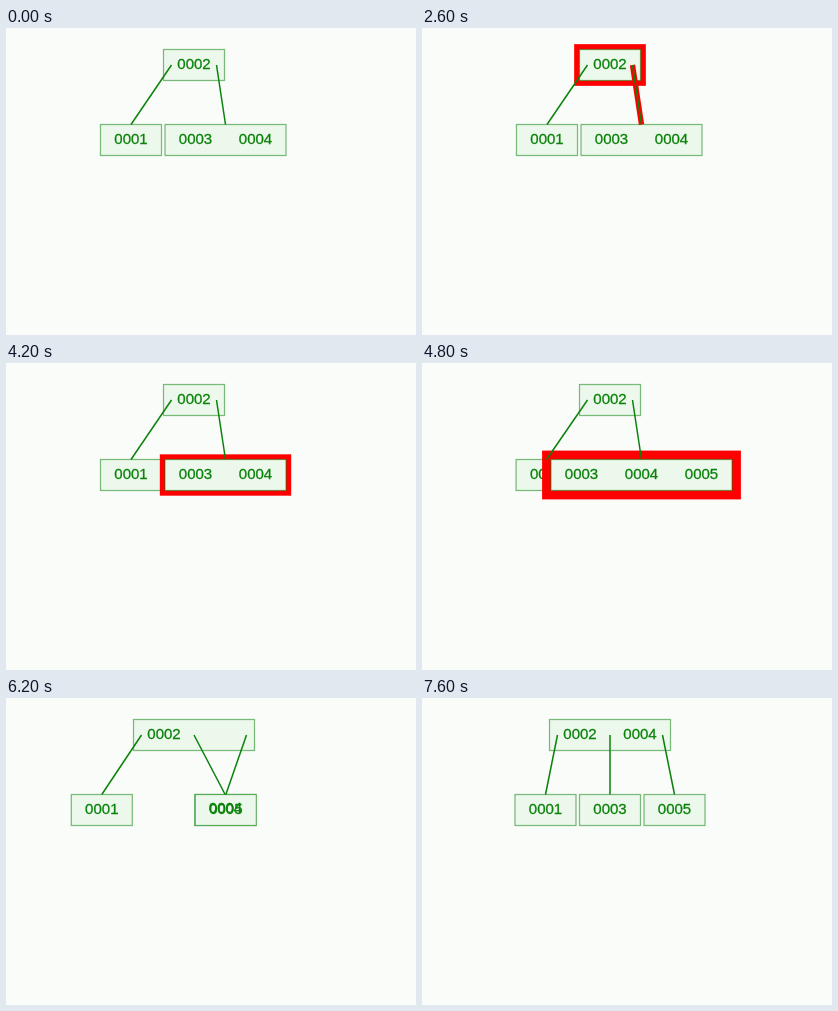
Animation of 410x307 px, one loop 8000 ms. Source, as an HTML page with a canvas:

```html
<!DOCTYPE html>
<html lang="en">
<head>
<meta charset="utf-8">
<title>Tree insertion</title>
<style>
  html, body { margin: 0; width: 100%; height: 100%; overflow: hidden; background: #fafcfa; }
  canvas { display: block; }
</style>
</head>
<body>
<canvas id="stage" width="410" height="307"></canvas>
<script>
const ctx = document.getElementById('stage').getContext('2d');
const LOOP = 8000, TICK = 100, LAST = 7600;
const GREEN = '#0a820a', BORDER = 'rgba(0,125,0,.5)', FILL = '#ecf8ec', RED = '#ff0000';
const ROOT_Y = 37, LEAF_Y = 112, SLOT = 60, HALF_H = 15.5;

// After the opening highlight, each block of the insertion takes the same time.
const START = 500, BLOCK = 1405;
const at = n => 565 + n * BLOCK;
const FOLLOW = at(1), DESCEND = at(2), INSERT = at(3), SPLIT = at(4), DONE = at(5);

const mix = (a, b, p) => a + (b - a) * p;
const progress = (t, from) => Math.min(1, Math.max(0, (t - from) / BLOCK));

// Triangle wave for the size of the highlight.
function pulse(t) {
  const low = 4.5, high = 11.2, half = 790, peak = 330;
  const phase = ((t - peak) % (2 * half) + 2 * half) % (2 * half);
  return low + (high - low) * Math.abs(phase - half) / half;
}

function label(text, x, y) {
  ctx.fillStyle = ctx.strokeStyle = GREEN;
  ctx.lineWidth = 0.3;
  ctx.fillText(text, x, y + 4);
  ctx.strokeText(text, x, y + 4);
}

function node(x, y, keys, glow = 0) {
  const w = keys.length * SLOT + 1;
  const left = x - w / 2, top = y - HALF_H;
  if (glow) {
    ctx.fillStyle = RED;
    ctx.fillRect(left - glow, top - glow, w + 2 * glow, 2 * (HALF_H + glow));
  }
  ctx.fillStyle = FILL;
  ctx.fillRect(left, top, w, 2 * HALF_H);
  ctx.strokeStyle = BORDER;
  ctx.lineWidth = 1.25;
  ctx.strokeRect(left, top, w, 2 * HALF_H);
  keys.forEach((key, i) => label(key, x + (i - (keys.length - 1) / 2) * SLOT, y));
}

function edge(from, to, glow = 0) {
  const stroke = (color, width) => {
    ctx.strokeStyle = color;
    ctx.lineWidth = width;
    ctx.beginPath();
    ctx.moveTo(from, ROOT_Y);
    ctx.lineTo(to, LEAF_Y - HALF_H);
    ctx.stroke();
  };
  if (glow) stroke(RED, glow);
  stroke(GREEN, 1.5);
}

function drawSearch(t) {
  const glow = t >= START ? pulse(t) : 0;
  const onRoot = t < DESCEND;
  const leftX = mix(125, 95.5, progress(t, INSERT));
  const keys = t < INSERT ? ['0003', '0004'] : ['0003', '0004', '0005'];
  node(leftX, LEAF_Y, ['0001']);
  node(219.5, LEAF_Y, keys, onRoot ? 0 : glow);
  node(188, ROOT_Y, ['0002'], onRoot ? glow : 0);
  edge(165.5, leftX);
  edge(210.5, 219.5, t >= FOLLOW && onRoot ? glow : 0);
}

function drawSplit(t) {
  const p = progress(t, SPLIT);
  const leaves = [mix(95.5, 123.5, p), mix(219.5, 188, p), mix(219.5, 252.5, p)];
  node(188, ROOT_Y, ['0002', t < DONE ? '' : '0004']);
  ['0001', '0003', '0005'].forEach((key, i) => node(leaves[i], LEAF_Y, [key]));
  if (t < DONE) label('0004', mix(219.5, 218, p), mix(LEAF_Y, ROOT_Y, p));
  [135.5, 188, 240.5].forEach((x, i) => edge(x, leaves[i]));
}

function draw(t) {
  ctx.fillStyle = '#fafcfa';
  ctx.fillRect(0, 0, 410, 307);
  ctx.font = '15px "Liberation Sans", Arial, sans-serif';
  ctx.textAlign = 'center';
  (t < SPLIT ? drawSearch : drawSplit)(t);
}

const begin = performance.now();
function frame() {
  const t = (performance.now() - begin) % LOOP;
  draw(Math.min(LAST, Math.floor(t / TICK) * TICK));
  requestAnimationFrame(frame);
}
frame();
</script>
</body>
</html>
```
